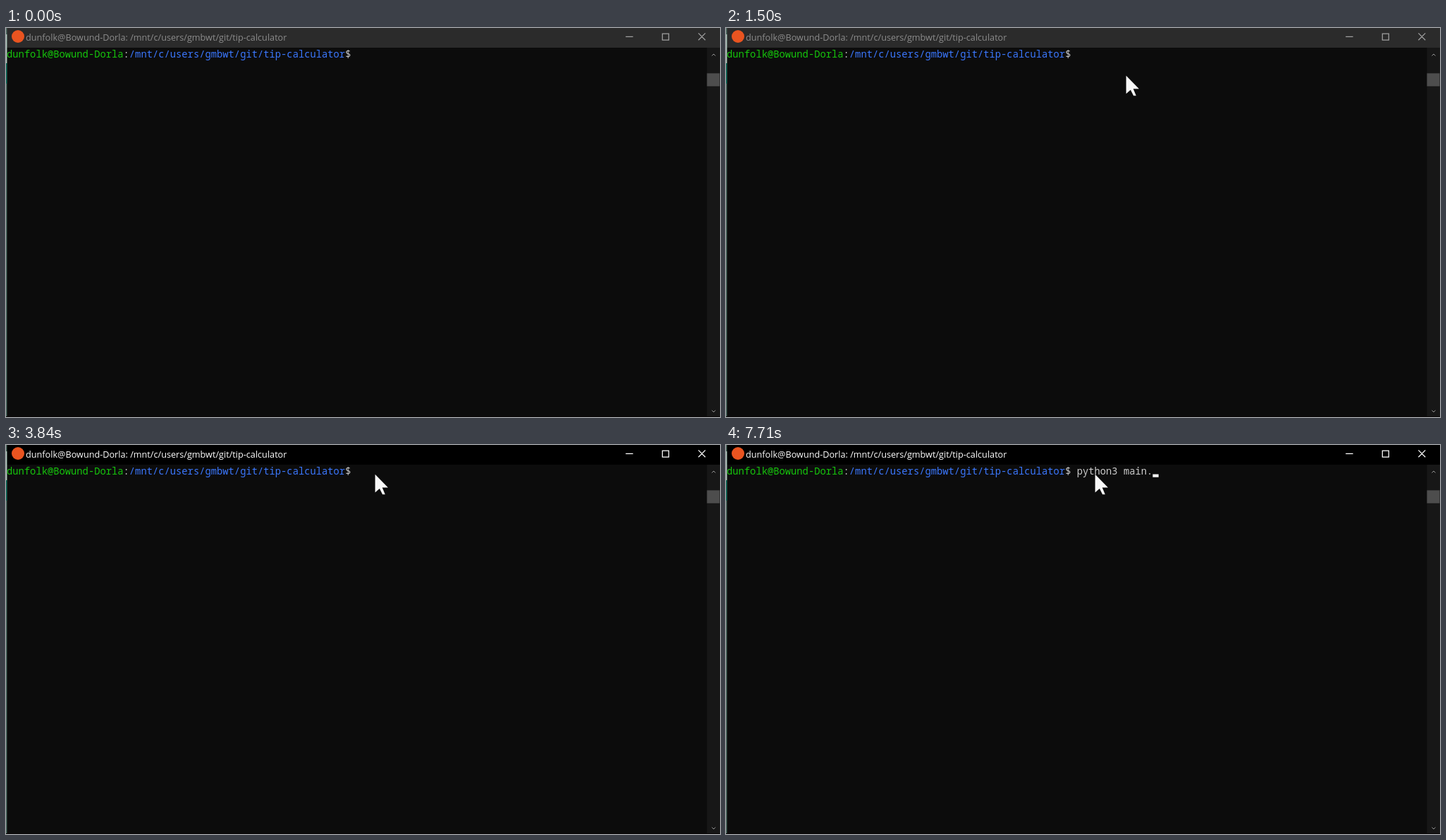
An HTML page that plays this animation: 1013 px wide and 553 px high, repeating every 8000 ms.

```html
<!DOCTYPE html>
<html lang="en">
<head>
<meta charset="utf-8">
<title>Terminal</title>
<style>
  html, body { margin: 0; width: 100%; height: 100%; overflow: hidden; background: #0c0c0c; }
  svg { display: block; }
  text { white-space: pre; }
  .mono { font: 13.8px "Noto Sans Mono", "DejaVu Sans Mono", monospace; fill: #ccc; font-variant-ligatures: none; }
  #title { font: 12.66px "Open Sans", "Noto Sans", sans-serif; }
</style>
</head>
<body>
<svg width="1013" height="553" viewBox="0 0 1013 553">
  <rect width="1013" height="553" fill="#0c0c0c"/>
  <rect id="bar" width="1013" height="28"/>
  <circle cx="17" cy="12" r="9" fill="#e95420"/>
  <text id="title" x="28" y="18">dunfolk@Bowund-Dorla: /mnt/c/users/gmbwt/git/tip-calculator</text>
  <g id="buttons" fill="none" stroke-width="1.25">
    <path d="M879.2 12.3h10.4M931.3 8h9v9h-9zM982.4 7.4l9.8 9.8M992.2 7.4l-9.8 9.8"/>
  </g>

  <rect x="994.5" y="28" width="18.5" height="525" fill="#171717"/>
  <rect x="994.5" y="64.4" width="18" height="18.4" fill="#4d4d4d"/>
  <path d="M1001.5 39.5l2.5-2.5 2.5 2.5M1001.5 543.5l2.5 2.5 2.5-2.5" fill="none" stroke="#999"/>

  <!-- Sliver of desktop beside the window -->
  <rect width="1.3" height="553" fill="#54766c"/>
  <rect y="9" width="1.3" height="41" fill="#b4ccc2"/>
  <rect y="50" width="1.3" height="29" fill="#08705f"/>
  <rect y="552" width="1013" height="1" fill="#080505"/>

  <text class="mono" x="1" y="41.8"><tspan fill="#16c60c">dunfolk@Bowund-Dorla</tspan>:<tspan fill="#3b78ff">/mnt/c/users/gmbwt/git/tip-calculator</tspan>$ <tspan id="typed"></tspan></text>
  <rect id="caret" y="41.5" width="8.3" height="4.3" fill="#f2f2f2"/>
  <path id="pointer" d="M-.3 -.3V25.6L6 20L10.2 28.3H13.9L9.8 18.5H18Z" fill="#f8f8f8"/>
  <circle id="click" cx="568" cy="68" r="13" fill="#f4f400" opacity=".5"/>
</svg>
<script>
const DURATION = 8000;
const CHAR_WIDTH = 8.28;
const COMMAND = "python3 main.";
const KEY_TIMES = [4070, 4400, 4790, 4950, 5040, 5280, 6120, 6280, 6470, 6600, 6780, 6930, 7710];
const CARET_ON = [[2280, 2810], [3360, 3840], [4070, 5970], [6120, 7560], [7710, DURATION]];

const easeOut = p => 1 - (1 - p) ** 2;
const easeInOut = p => p * p * (3 - 2 * p);
const MOVES = [
  { start: 140, end: 540, steps: 7, from: [954, 538], to: [743, 293], ease: easeOut, entering: true },
  { start: 770, end: 1500, steps: 10, from: [743, 293], to: [568, 68], ease: easeInOut },
  { start: 2200, end: 2430, steps: 4, from: [568, 68], to: [524, 42], ease: easeInOut }
];

const [bar, title, buttons, typed, caret, pointer, click] =
  ["bar", "title", "buttons", "typed", "caret", "pointer", "click"].map(id => document.getElementById(id));
const show = (element, visible) => element.setAttribute("visibility", visible ? "visible" : "hidden");

// The pointer is sampled in discrete steps, like a screen recording.
function pointerAt(time) {
  const move = MOVES.filter(m => time >= m.start).pop();
  if (!move) return null;
  const { start, end, steps, from, to, ease, entering } = move;
  const step = Math.min(steps - 1, Math.floor((time - start) / (end - start) * (steps - 1)));
  const progress = ease(entering ? step / (steps - 1) : (step + 1) / steps);
  return from.map((v, i) => Math.round(v + (to[i] - v) * progress));
}

function render(time) {
  const active = time >= 1720;
  bar.setAttribute("fill", active ? "#000" : "#2b2b2b");
  title.setAttribute("fill", active ? "#fff" : "#8c8c8c");
  buttons.setAttribute("stroke", active ? "#fff" : "#a0a0a0");

  const count = KEY_TIMES.filter(t => time >= t).length;
  typed.textContent = COMMAND.slice(0, count);
  caret.setAttribute("x", 1 + (60 + count) * CHAR_WIDTH);
  show(caret, CARET_ON.some(([on, off]) => time >= on && time < off));

  const position = pointerAt(time);
  show(pointer, position);
  if (position) pointer.setAttribute("transform", `translate(${position})`);
  show(click, active && time < 1800);
}

const startTime = performance.now();
function tick() {
  render((performance.now() - startTime) % DURATION);
  requestAnimationFrame(tick);
}
tick();
</script>
</body>
</html>
```
